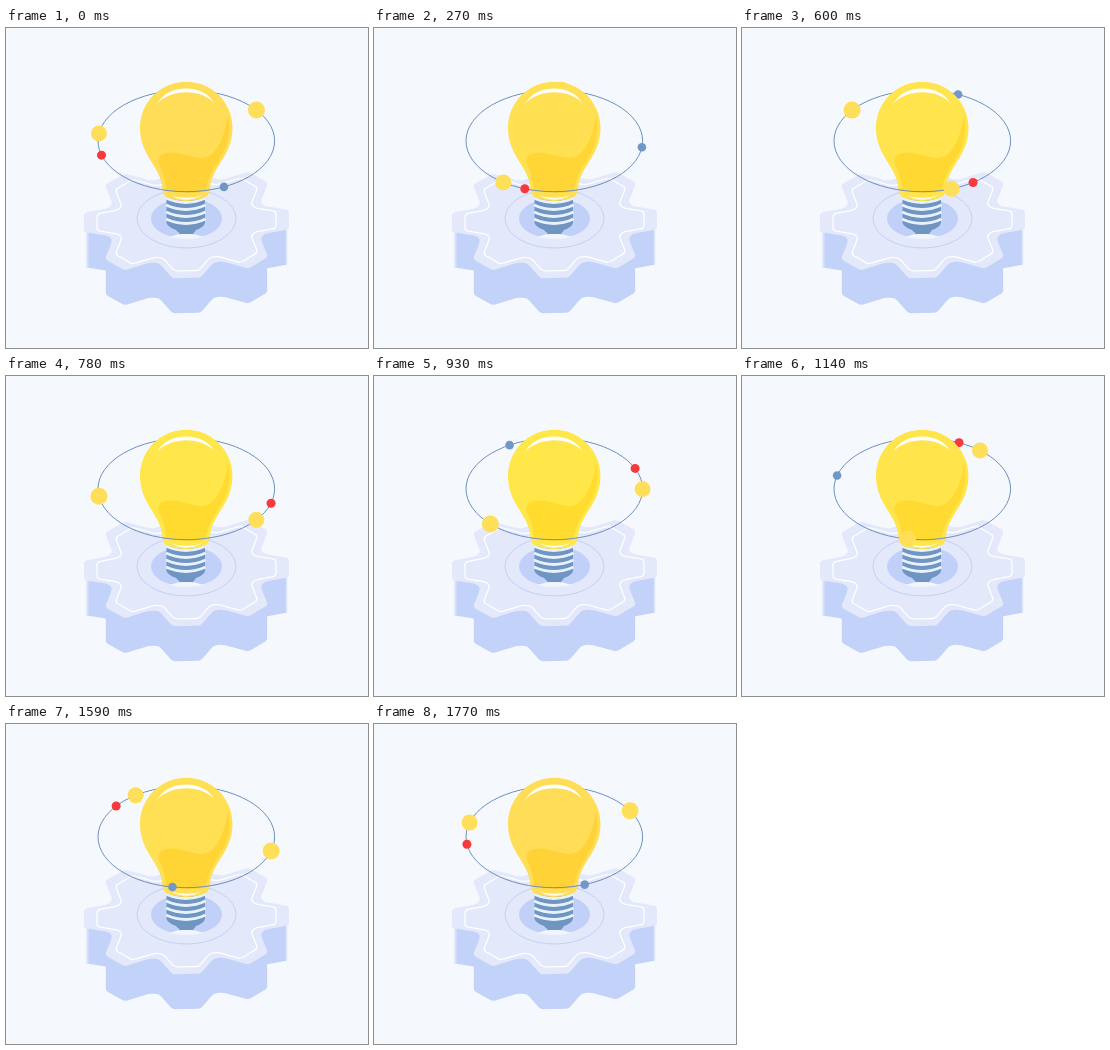
Write an HTML page that moves like this. It is 362 by 320 pixels and loops after 1.8 s.

```html
<!DOCTYPE html>
<html lang="en">
<head>
<meta charset="utf-8">
<title>Light bulb on a gear</title>
<style>
html, body { margin: 0; width: 100%; height: 100%; overflow: hidden; background: #f5f9fd; }
svg { display: block; width: 362px; height: 320px; }
.orbit { fill: none; stroke: #6d90c0; }
</style>
</head>
<body>
<svg viewBox="0 0 362 320">
  <path id="side" fill="#c2d2f9"/>
  <path id="face" fill="#e3e8fb"/>
  <path id="rim" fill="none" stroke="#fff" stroke-width="1.3"/>
  <ellipse cx="180.5" cy="190.5" rx="49.5" ry="29.5" fill="none" stroke="#c2d2f4"/>
  <ellipse cx="180.5" cy="190.5" rx="35.5" ry="20" fill="#c0d0f8"/>
  <path d="M163 209Q180 202 198 209Q180 213 163 209" fill="#f1f5fe"/>

  <g id="behind"><path id="backArc" class="orbit" d="M268.6 112.9A88.3 50.8 0 0 0 92 112.9"/></g>

  <path d="M160.500 166H199V195Q198 199 190 202L187 206H174L170 202Q162 199 160.500 195Z" fill="#7095c2"/>
  <path id="thread" fill="none" stroke="#e8f2fb" stroke-width="3"/>

  <path id="glass" d="M134 100C134 74 155 53.800 180.200 53.800S226.500 74 226.500 100C226.500 128 206 138 204 160Q204 165 200 169Q180 177 160 169Q156.500 165 156.500 160C154.500 138 134 128 134 100"/>
  <path id="shade" d="M222 86C220 104 213 124 201 129C189 133 175 122 160 125C151 127 151 134 155 141Q159 149 160 162Q180 168 200 163C201 145 215 133 221 115Q225 101 222 86"/>
  <path d="M151.500 75.500C162 55.500 198 55.500 208.500 75.500C196 60.500 165 60.500 151.500 75.500" fill="#fff"/>
  <path d="M165 167.500Q180 172 196 167.500Q180 176 165 167.500" fill="#fffbe6"/>

  <g id="front"><path id="frontArc" class="orbit" d="M92 112.900A88.300 50.800 0 0 0 268.600 112.900"/></g>
</svg>
<script>
const LOOP = 1800, STEP = 30;
const el = id => document.getElementById(id);

// One quarter of the gear outline, as offsets from its centre
const quarter = [[102.5, 9.5], [78, 14], [74, 18], [81.5, 37], [62, 48.5], [36, 41], [27, 42], [14, 57]];
const flip = (points, sx, sy) => points.map(([x, y]) => [x * sx, y * sy]);
const frontHalf = [...quarter, ...flip(quarter, -1, 1).reverse()];
const outline = [...frontHalf, ...flip(frontHalf, -1, -1)];

// Point at most r away from p on the way to q
function toward(p, q, r) {
  const dx = q[0] - p[0], dy = q[1] - p[1];
  const k = Math.min(0.5, r / Math.hypot(dx, dy));
  return [p[0] + dx * k, p[1] + dy * k];
}

// Closed path with softened corners, tilted slightly up to the right
function gear(points, scale, dy = 0) {
  const placed = points.map(([x, y]) => [180.5 + x * scale, 193 + dy + (y - x * 0.014) * scale]);
  const corners = placed.map((p, i) => {
    const n = placed.length;
    const from = toward(p, placed[(i + n - 1) % n], 3);
    const to = toward(p, placed[(i + 1) % n], 3);
    return `${from}Q${p} ${to}`;
  });
  return "M" + corners.join("L") + "Z";
}

el("face").setAttribute("d", gear(outline, 1));
el("rim").setAttribute("d", gear(outline, 0.873));
let layers = "";
for (let dy = 0; dy <= 35; dy++) layers += gear(frontHalf, 1, dy);
el("side").setAttribute("d", layers);

el("thread").setAttribute("d",
  [170, 177, 184, 191].map(y => `M160 ${y}Q180 ${y + 9} 199.500 ${y}`).join(""));

// Start is measured along the orbit: 0 = left end, 1 = right end
const balls = [
  { start: 1.966, r: 8, color: "#ffdf59" },
  { start: 1.167, r: 8.5, color: "#ffdf59" },
  { start: 0.0665, r: 4.5, color: "#f8383a" },
  { start: 0.671, r: 4.3, color: "#7097c6" }
];
for (const ball of balls) {
  ball.node = document.createElementNS("http://www.w3.org/2000/svg", "circle");
  ball.node.setAttribute("r", ball.r);
  ball.node.setAttribute("fill", ball.color);
}

const arcs = [el("frontArc"), el("backArc")];
const groups = [el("front"), el("behind")];
const half = arcs[0].getTotalLength();
const mix = (a, b, k) => `rgb(${a.map((v, i) => Math.round(v + (b[i] - v) * k))})`;

function draw(t) {
  for (const { start, node } of balls) {
    const s = (start + 2 * t / LOOP) % 2;
    const side = Math.floor(s);
    const p = arcs[side].getPointAtLength((s - side) * half);
    node.setAttribute("cx", p.x);
    node.setAttribute("cy", p.y);
    groups[side].append(node);
  }
  const glow = 1 - Math.abs(1 - 2 * t / LOOP);
  el("glass").setAttribute("fill", mix([255, 221, 86], [255, 231, 73], glow));
  el("shade").setAttribute("fill", mix([255, 211, 56], [255, 220, 46], glow));
}

let begin;
function tick(now) {
  begin ??= now;
  draw(Math.floor((now - begin) % LOOP / STEP) * STEP);
  requestAnimationFrame(tick);
}
requestAnimationFrame(tick);
</script>
</body>
</html>
```
